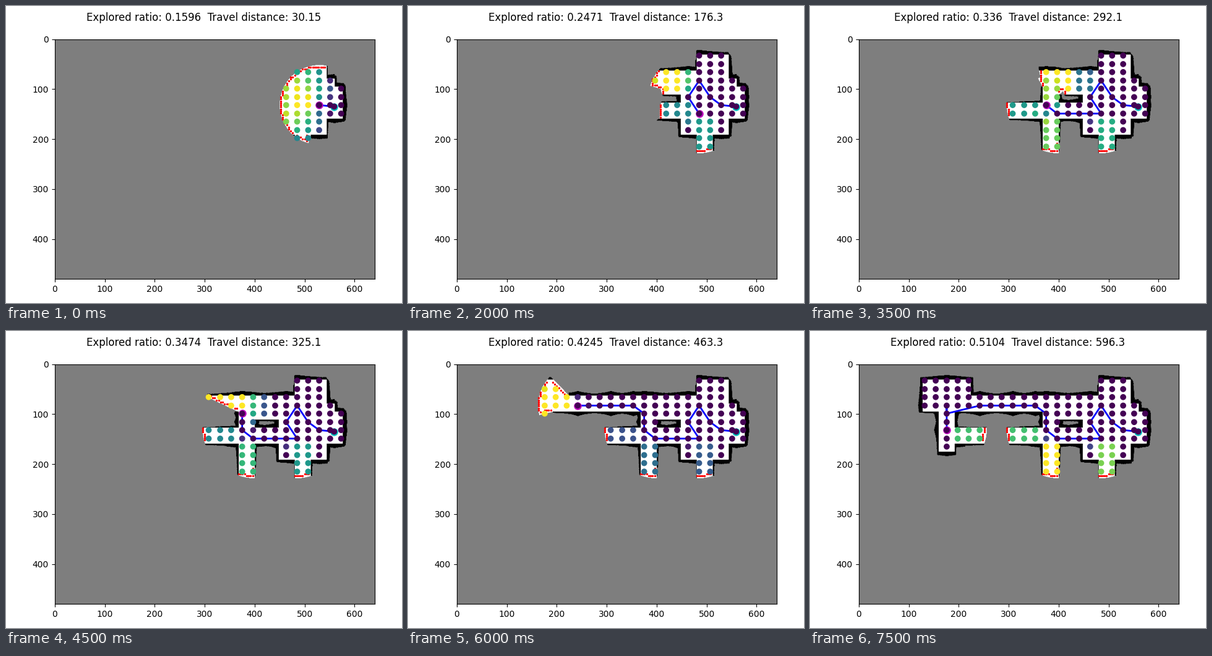
Animation of 640x480 px, one loop 8000 ms. Source, as a matplotlib script:

```python
import math

import matplotlib.pyplot as plt
import numpy as np
from matplotlib.animation import FuncAnimation

W, H = 640, 480
WALL, UNKNOWN, FREE = 1, 127, 255
SENSOR, VIEW, CELL = 80, 70, 4
WALL_DEPTH = 9

# Floor plan in tiles: x0, x1, y0, y1 of each open area
TILE = 16
PLAN = [
    (30, 34, 2, 12), (28, 34, 4, 12), (34, 35, 5, 10), (35, 36, 6, 10),
    (30, 32, 12, 16), (14, 28, 4, 6), (25, 28, 6, 7), (12, 28, 8, 10),
    (23, 25, 4, 16), (8, 14, 2, 6), (10, 12, 6, 11),
]
TOTAL = 340 * TILE ** 2  # free area of the whole building

XS, YS = (np.linspace(0, n - 1, 30).round().astype(int).tolist() for n in (W, H))
START = (559, 135)
STOPS = [(24, 8), (23, 7), (22, 5), (21, 7), (22, 9), (20, 9), (18, 9), (17, 8),
         (17, 7), (17, 6), (16, 5), (14, 5), (11, 5), (8, 6), (8, 5), (8, 8)]
ROUTE = [START] + [(XS[c], YS[r]) for c, r in STOPS]

truth = np.full((H, W), WALL, np.uint8)
for x0, x1, y0, y1 in PLAN:
    truth[y0 * TILE:y1 * TILE, x0 * TILE:x1 * TILE] = FREE


def walk(x, y, x1, y1):
    """Cells on a 4-connected line, without the end cell."""
    dx, dy = abs(x1 - x), abs(y1 - y)
    sx, sy = (1 if x1 > x else -1), (1 if y1 > y else -1)
    err = dx - dy
    for _ in range(dx + dy):
        yield x, y
        if err > 0:
            x += sx
            err -= 2 * dy
        else:
            y += sy
            err += 2 * dx


def scan(belief, x, y):
    """Reveal what the range sensor sees from x, y."""
    for k in range(720):
        a = math.radians(k / 2)
        end = round(x + SENSOR * math.cos(a)), round(y + SENSOR * math.sin(a))
        depth = 0
        for cx, cy in walk(x, y, *end):
            value = truth.item(cy, cx)
            if value == WALL:
                depth += 1
                if depth > WALL_DEPTH:
                    break
            elif depth:
                break
            belief[cy, cx] = value


def find_frontiers(belief):
    """Free coarse cells that border the unknown."""
    rows, cols = H // CELL, W // CELL
    coarse = belief.reshape(rows, CELL, cols, CELL).min(axis=(1, 3))
    dark = np.pad((coarse == UNKNOWN).astype(int), 1)
    near = sum(dark[1 + j:1 + j + rows, 1 + i:1 + i + cols]
               for i in (-1, 0, 1) for j in (-1, 0, 1) if i or j)
    ys, xs = np.nonzero((coarse == FREE) & (near > 1) & (near < 8))
    return set(zip((xs * CELL).tolist(), (ys * CELL).tolist()))


def sees(belief, node, point):
    return (math.dist(node, point) < VIEW and
            all(belief.item(y, x) == FREE for x, y in walk(*node, *point)))


def explore():
    """Belief, frontiers, nodes and node scores after each move."""
    belief = np.full((H, W), UNKNOWN, np.uint8)
    seen, closed, known = {}, set(), set()
    for stop in ROUTE:
        scan(belief, *stop)
        closed.add(stop)
        frontiers = find_frontiers(belief)
        nodes = [START] + [(x, y) for x in XS for y in YS if belief[y, x] == FREE]
        for node in nodes:
            if node in closed:
                seen[node] = set()
                continue
            new = frontiers - known if node in seen else frontiers
            kept = seen.get(node, set()) & frontiers
            seen[node] = kept | {p for p in new if sees(belief, node, p)}
            if not seen[node]:
                closed.add(node)
        known = frontiers
        yield belief.copy(), frontiers, nodes, np.array([len(seen[n]) for n in nodes])


states = list(explore())[1:]
travel = np.cumsum([math.dist(a, b) for a, b in zip(ROUTE, ROUTE[1:])])

fig, ax = plt.subplots(figsize=(6.4, 4.8), dpi=100)
title = fig.suptitle("")
image = ax.imshow(states[0][0], cmap="gray", vmin=WALL, vmax=FREE)
ax.axis((0, W, H, 0))
node_dots = ax.scatter([0], [0], c=[0], zorder=5)
frontier_dots = ax.scatter([0], [0], c="r", s=2, zorder=3)
path, = ax.plot([], [], "b", linewidth=2)
robot, = ax.plot([], [], "mo", markersize=8)
ax.plot(*START, "co", markersize=8)


def update(i):
    belief, frontiers, nodes, scores = states[i]
    image.set_data(belief)
    node_dots.set_offsets(nodes)
    node_dots.set_array(scores)
    node_dots.set_clim(0, max(scores.max(), 1))
    frontier_dots.set_offsets(sorted(frontiers))
    path.set_data(*zip(*ROUTE[:i + 2]))
    robot.set_data(*zip(ROUTE[i + 1]))
    ratio = np.count_nonzero(belief == FREE) / TOTAL
    title.set_text(f"Explored ratio: {ratio:.4g}  Travel distance: {travel[i]:.4g}")
    return image, node_dots, frontier_dots, path, robot, title


update(0)
fig.tight_layout()
anim = FuncAnimation(fig, update, frames=len(states), interval=500, repeat=True,
                     repeat_delay=0, blit=False)
plt.show()
```
